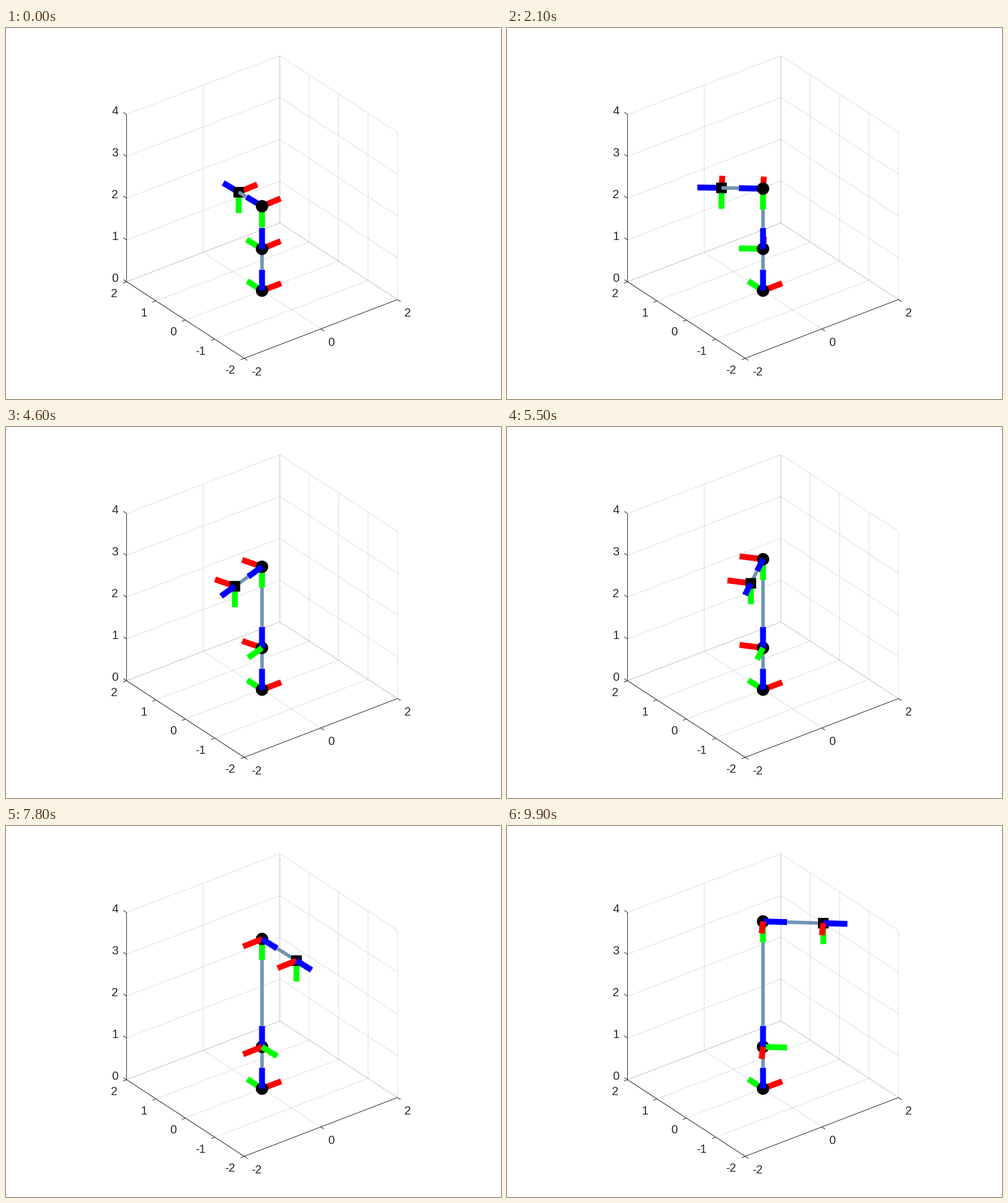
Animation, 840 px wide and 630 px high, one loop 10000 ms. Source, as a matplotlib script:

```python
import numpy as np
import matplotlib.pyplot as plt
from matplotlib.animation import FuncAnimation
from matplotlib.patches import Polygon

plt.rcParams["path.snap"] = False

W, H, DPI = 840, 630, 100
PX = 72 / DPI          # points per pixel
FRAMES, INTERVAL = 100, 100

# Orthographic view, azimuth -37.5, elevation 30
AZ, EL = np.radians([-37.5, 30])
SCALE = 81.97
ORIGIN = np.array([434.45, 446.0])
RIGHT = np.array([np.cos(AZ), np.sin(AZ), 0])
UP = np.array([-np.sin(AZ) * np.sin(EL), np.cos(AZ) * np.sin(EL), np.cos(EL)])
TOWARD = np.array([np.sin(AZ) * np.cos(EL), -np.cos(AZ) * np.cos(EL), np.sin(EL)])

INK = "#262626"
RED, GREEN, BLUE, STEEL = "#ff0000", "#00ff00", "#0000ff", "#7393b3"
X, Y, Z = np.eye(3)
AXIS_LEN = 0.5

ANGLES = np.linspace(0, 2 * np.pi, 60, endpoint=False)
ROUND = 10.5 * np.column_stack([np.cos(ANGLES), np.sin(ANGLES)])
SQUARE = 9 * np.array([(-1, -1), (1, -1), (1, 1), (-1, 1)])

fig = plt.figure(figsize=(W / DPI, H / DPI), dpi=DPI, facecolor="white")
ax = fig.add_axes([0, 0, 1, 1])
ax.set_xlim(0, W)
ax.set_ylim(H, 0)
ax.axis("off")


def project(p):
    p = np.asarray(p, float)
    return ORIGIN + SCALE * np.array([p @ RIGHT, -(p @ UP)])


def line(points, width=1, **style):
    xy = np.array([project(p) for p in points])
    return ax.plot(xy[:, 0], xy[:, 1], lw=width * PX,
                   solid_capstyle="butt", **style)[0]


def draw_box():
    grid = dict(color=INK, alpha=0.15, zorder=-30)
    xs, ys, zs = (-2, 0, 2), range(-2, 3), range(5)
    for x in xs:
        if x > -2:
            line([(x, 2, 0), (x, 2, 4)], **grid)
        line([(x, -2, 0), (x, 2, 0)], **grid)
    for y in ys:
        if y > -2:
            line([(-2, y, 0), (2, y, 0)], **grid)
        line([(2, y, 0), (2, y, 4)], **grid)
    for z in zs:
        line([(-2, 2, z), (2, 2, z)], **grid)
        line([(2, -2, z), (2, 2, z)], **grid)

    axis = dict(color=INK, zorder=-20)
    line([(-2, 2, 4), (-2, 2, 0), (-2, -2, 0), (2, -2, 0)],
         solid_joinstyle="miter", **axis)
    for x in xs:
        tick((x, -2, 0), -Y, (12, 28.8), x, "left", axis)
    for y in ys:
        tick((-2, y, 0), -X, (-15, 26.3), y, "right", axis)
    for z in zs:
        tick((-2, 2, z), Y, (-14, 0.1), z, "right", axis)


def tick(p, direction, offset, value, align, axis):
    p = np.array(p, float)
    size = np.linalg.norm(project(direction) - ORIGIN)
    line([p, p + direction * 6.5 / size], **axis)
    x, y = project(p) + offset
    ax.text(x, y, str(value), family="Liberation Sans", fontsize=20 * PX,
            color=INK, ha=align, va="baseline")


def pose(i):
    """Joint positions and frame axes: rotate, lift, then extend."""
    k = i + 1
    turn, lift, reach = 0.04 * k, 2 + 0.02 * k, 0.75 + 0.005 * k
    u = np.array([np.cos(turn), np.sin(turn), 0])
    v = np.array([-np.sin(turn), np.cos(turn), 0])
    elbow = lift * Z
    return [(0 * Z, (X, Y, Z)), (Z, (u, v, Z)),
            (elbow, (u, -Z, v)), (elbow + reach * v, (u, -Z, v))]


def bar(color, width):
    return ax.plot([], [], color=color, lw=width * PX, solid_capstyle="butt")[0]


def place_bar(artist, a, b):
    artist.set_data(*np.transpose([project(a), project(b)]))
    artist.set_zorder((a + b) @ TOWARD / 2)


def place_dot(artist, shape, p):
    artist.set_xy(project(p) + shape)
    artist.set_zorder(p @ TOWARD)


draw_box()
links = [bar(STEEL, 6) for _ in range(3)]
triads = [[bar(c, 10) for c in (RED, GREEN, BLUE)] for _ in range(4)]
shapes = [ROUND, ROUND, ROUND, SQUARE]
dots = [ax.add_patch(Polygon(s, facecolor="black", lw=0)) for s in shapes]


def update(i):
    joints = pose(i)
    for (p, dirs), triad, dot, shape in zip(joints, triads, dots, shapes):
        place_dot(dot, shape, p)
        for d, b in zip(dirs, triad):
            place_bar(b, p, p + AXIS_LEN * d)
    base, shoulder, elbow, tip = (p for p, _ in joints)
    forward = joints[2][1][2]
    # Only the stretches of the links not covered by frame axes
    place_bar(links[0], base + AXIS_LEN * Z, shoulder)
    place_bar(links[1], shoulder + AXIS_LEN * Z, elbow - AXIS_LEN * Z)
    place_bar(links[2], elbow + AXIS_LEN * forward, tip)
    return links + dots + sum(triads, [])


anim = FuncAnimation(fig, update, frames=FRAMES, interval=INTERVAL,
                     init_func=lambda: update(0), repeat=True,
                     repeat_delay=0, blit=False)
plt.show()
```
